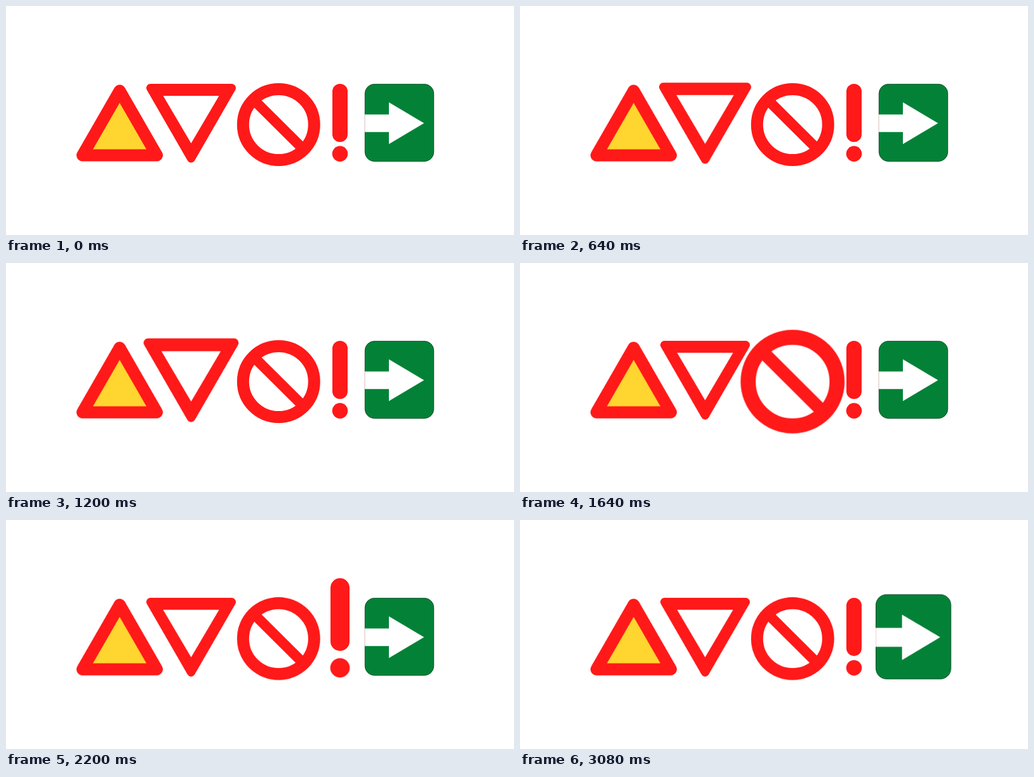
An HTML page without scripts that plays this animation: 800 by 362 pixels, repeating every 3120 ms.

```html
<!DOCTYPE html>
<html lang="en">
<head>
<meta charset="utf-8">
<title>Road sign word</title>
<style>
  html, body { margin: 0; width: 100%; height: 100%; overflow: hidden; background: #fff; }
  svg { display: block; width: 800px; height: 362px; }

  .red { fill: #ff1919; stroke: #ff1919; stroke-linejoin: round; }
  .ring { fill: #fff; stroke: #ff1919; }
  .flat { stroke: none; }
  .white { fill: #fff; }

  /* each sign swells in its own fifth of the loop */
  .pop { animation: pop 3120ms linear var(--at, 0ms) infinite; }
  .a { transform-origin: 179px 185px; }
  .v { transform-origin: 291.5px 185px; --at: 624ms; }
  .o { transform-origin: 429.3px 187.5px; --at: 1248ms; }
  .bar { transform-origin: 526px 247px; --at: 1872ms; }
  .dot { transform-origin: 526px 233.6px; --at: 1872ms; }
  .exit { transform-origin: 619.5px 184.6px; --at: 2525ms; animation-name: pop-cut; }

  @keyframes pop {
    0% { transform: scale(1); animation-timing-function: cubic-bezier(.333, .667, .667, 1); }
    9.3%, 13.85% { transform: scale(1.25); }
    20%, 100% { transform: scale(1); }
  }
  /* the last sign snaps back when the loop restarts */
  @keyframes pop-cut {
    0% { transform: scale(1); animation-timing-function: cubic-bezier(.333, .667, .667, 1); }
    9.3%, 13.85% { transform: scale(1.25); }
    19.07% { transform: scale(1.038); }
    19.08%, 100% { transform: scale(1); }
  }
</style>
</head>
<body>
<svg viewBox="0 0 800 362">
  <g class="pop a">
    <path class="red" style="fill:#ffd52f" stroke-width="19" d="M179 134L237.5 236H120.5Z"/>
  </g>

  <g class="pop v">
    <path class="red" stroke-width="13" d="M227.5 129.5H355.5L291.5 241Z"/>
    <path class="white" d="M247.5 142H335.5L291.5 217Z"/>
  </g>

  <g class="pop o">
    <circle class="ring" cx="429.3" cy="187.5" r="56" stroke-width="19"/>
    <path class="red" stroke-width="16.3" d="M389.7 147.9L468.9 227.1"/>
  </g>

  <rect class="pop bar red flat" x="514" y="123" width="24" height="92" rx="12"/>
  <circle class="pop dot red flat" cx="526" cy="233.6" r="12.3"/>

  <g class="pop exit">
    <rect x="565.3" y="123.4" width="108.4" height="122.3" rx="15" fill="#038237" stroke="#04391b" stroke-width=".8"/>
    <path class="white" d="M564.8 171.5H603V152.3L658.3 185.2L603 218.3V199.2H564.8Z"/>
    <path d="M565.4 172V199" stroke="#f9c4c4" stroke-width=".8"/>
  </g>
</svg>
</body>
</html>
```
